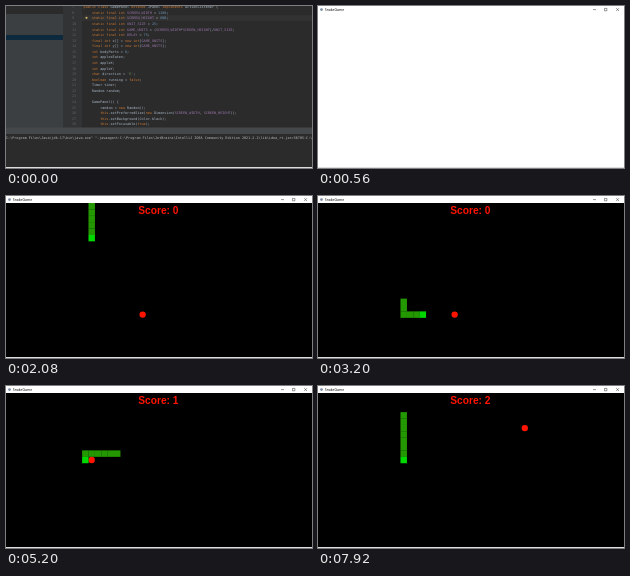
Recreate the animation shown at these times as an HTML page with a canvas. Size 306 by 162 pixels, loop 8000 ms.

```html
<!DOCTYPE html>
<html lang="en">
<head>
<meta charset="utf-8">
<title>Snake</title>
<style>
html, body { margin: 0; width: 100%; height: 100%; overflow: hidden; background: #000; }
canvas { display: block; width: 306px; height: 162px; }
</style>
</head>
<body>
<canvas id="stage" width="306" height="162"></canvas>
<script>
const g = document.getElementById('stage').getContext('2d');
const LOOP = 8000, TICK = 80, CELL = 6.375, LEFT = -0.4, TOP = 7;
const OPEN = 4, PLAY = 8;               // ticks: window appears, game appears
const MONO = '3.44px "DejaVu Sans Mono", monospace';

const CODE = `public class GamePanel extends JPanel implements ActionListener {
    static final int SCREEN_WIDTH = 1200;
    static final int SCREEN_HEIGHT = 600;
    static final int UNIT_SIZE = 25;
    static final int GAME_UNITS = (SCREEN_WIDTH*SCREEN_HEIGHT)/UNIT_SIZE;
    static final int DELAY = 75;
    final int x[] = new int[GAME_UNITS];
    final int y[] = new int[GAME_UNITS];
    int bodyParts = 6;
    int applesEaten;
    int appleX;
    int appleY;
    char direction = 'R';
    boolean running = false;
    Timer timer;
    Random random;

    GamePanel() {
        random = new Random();
        this.setPreferredSize(new Dimension(SCREEN_WIDTH, SCREEN_HEIGHT));
        this.setBackground(Color.black);
        this.setFocusable(true);`.split('\n');
const CONSOLE = String.raw`C:\Program Files\Java\jdk-17\bin\java.exe" "-javaagent:C:\Program Files\JetBrains\IntelliJ IDEA Community Edition 2021.2.2\lib\idea_rt.jar=56705:C:\Program Files`;
const KEYWORD = /^(public|class|extends|implements|static|final|int|new|char|boolean|false|true|this)$/;

// Every cell the head visits, one entry per game step
const path = [[0, 0]];
const DIRS = { R: [1, 0], L: [-1, 0], U: [0, -1], D: [0, 1] };
for (const leg of 'R13 D17 R9 U8 L10 D3 R8 U1 L8 U8 R1 D7'.split(' ')) {
  const [dx, dy] = DIRS[leg[0]];
  for (let i = +leg.slice(1); i > 0; i--) {
    const [x, y] = path[path.length - 1];
    path.push([x + dx, y + dy]);
  }
}
const APPLES = [[21, 17], [13, 10], [32, 5]];
const MEALS = [38, 93];                 // steps on which an apple is eaten
const SKIPS = [24, 28, 33, 37, 94];     // ticks that advance two steps
const STALLS = [25, 29, 34];            // ticks that do not advance

const upTo = (list, n) => list.filter(v => v <= n).length;

function box(color, x, y, w, h) {
  g.fillStyle = color;
  g.fillRect(x, y, w, h);
}

function text(str, x, y, color, font) {
  g.font = font;
  g.fillStyle = color;
  g.fillText(str, x, y);
}

function dot(color, x, y, r) {
  g.fillStyle = color;
  g.beginPath();
  g.arc(x, y, r, 0, 7);
  g.fill();
}

function tokenColor(word) {
  if (KEYWORD.test(word)) return '#cc7832';
  if (/^\d+$/.test(word)) return '#6897bb';
  if (/^'/.test(word)) return '#6a8759';
  if (/^[A-Z]+_[A-Z]+$|^DELAY$/.test(word)) return '#9876aa';
  return '#a9b7c6';
}

function drawEditor() {
  box('#2b2b2b', 0, 0, 306, 162);
  box('#3c3f41', 0, 8, 57, 114);
  box('#0d293e', 0, 29, 57, 5);
  box('#313335', 57, 0, 19, 122);
  box('#323232', 76, 9.3, 230, 5.6);
  CODE.forEach((line, i) => {
    const y = 2.3 + i * 5.57;
    text(i + 7, 66, y, '#606366', MONO);
    const step = g.measureText('m').width;
    for (const m of line.matchAll(/'\w'|\w+|[^\s\w]/g))
      text(m[0], 77.6 + m.index * step, y, tokenColor(m[0]), MONO);
  });
  dot('#d0b060', 80.5, 11.8, 1.1);
  box('#45484a', 0, 121.5, 306, 6.5);
  text(CONSOLE, 0, 132.5, '#bbb', MONO);
}

function drawWindow(body) {
  box('#fff', 0, 0, 306, 161);
  box(body, 0, TOP, 306, 161 - TOP);
  dot('#7f8fa3', 3.5, 3.6, 1.4);
  text('SnakeGame', 6.8, 4.8, '#000', '3.5px "Open Sans", sans-serif');
  g.strokeStyle = '#333';
  g.lineWidth = 0.5;
  g.beginPath();
  g.moveTo(275, 3.6); g.lineTo(278, 3.6);
  g.rect(286.5, 2.4, 2.4, 2.4);
  g.moveTo(298.2, 2.2); g.lineTo(301, 5);
  g.moveTo(301, 2.2); g.lineTo(298.2, 5);
  g.stroke();
}

// The blank window grows and fades in over the editor
function drawOpening(k) {
  const scale = 1 - 0.06 * (1 - k) ** 1.2;
  g.save();
  g.globalAlpha = Math.min(1, k * 1.15 - 0.12);
  g.translate(153, 80);
  g.scale(scale, scale);
  g.translate(-153, -80);
  drawWindow('#fff');
  g.restore();
}

function drawGame(step) {
  const score = upTo(MEALS, step);
  const px = x => LEFT + x * CELL, py = y => TOP + y * CELL;
  const [ax, ay] = APPLES[score];
  drawWindow('#000');
  dot('#ff1400', px(ax + 0.5), py(ay + 0.5), CELL / 2);
  for (let i = 5 + score; i >= 0; i--) {
    const [x, y] = path[Math.max(0, step - i)];
    box(i ? '#249800' : '#00d800', px(x), py(y), CELL + 0.1, CELL + 0.1);
  }
  g.textAlign = 'center';
  text('Score: ' + score, 152.4, 17.6, '#ff1400', 'bold 10.2px "Liberation Sans", Arial, sans-serif');
  g.textAlign = 'left';
}

function draw(t) {
  const tick = Math.floor(t / TICK);
  if (tick < PLAY) {
    drawEditor();
    if (tick >= OPEN) drawOpening((tick - OPEN + 1) / (PLAY - OPEN));
  } else {
    drawGame(tick - PLAY + upTo(SKIPS, tick) - upTo(STALLS, tick));
  }
  box('#ddd', 0, 161, 306, 1);
}

const start = performance.now();
function loop() {
  draw((performance.now() - start) % LOOP);
  requestAnimationFrame(loop);
}
loop();
</script>
</body>
</html>
```
